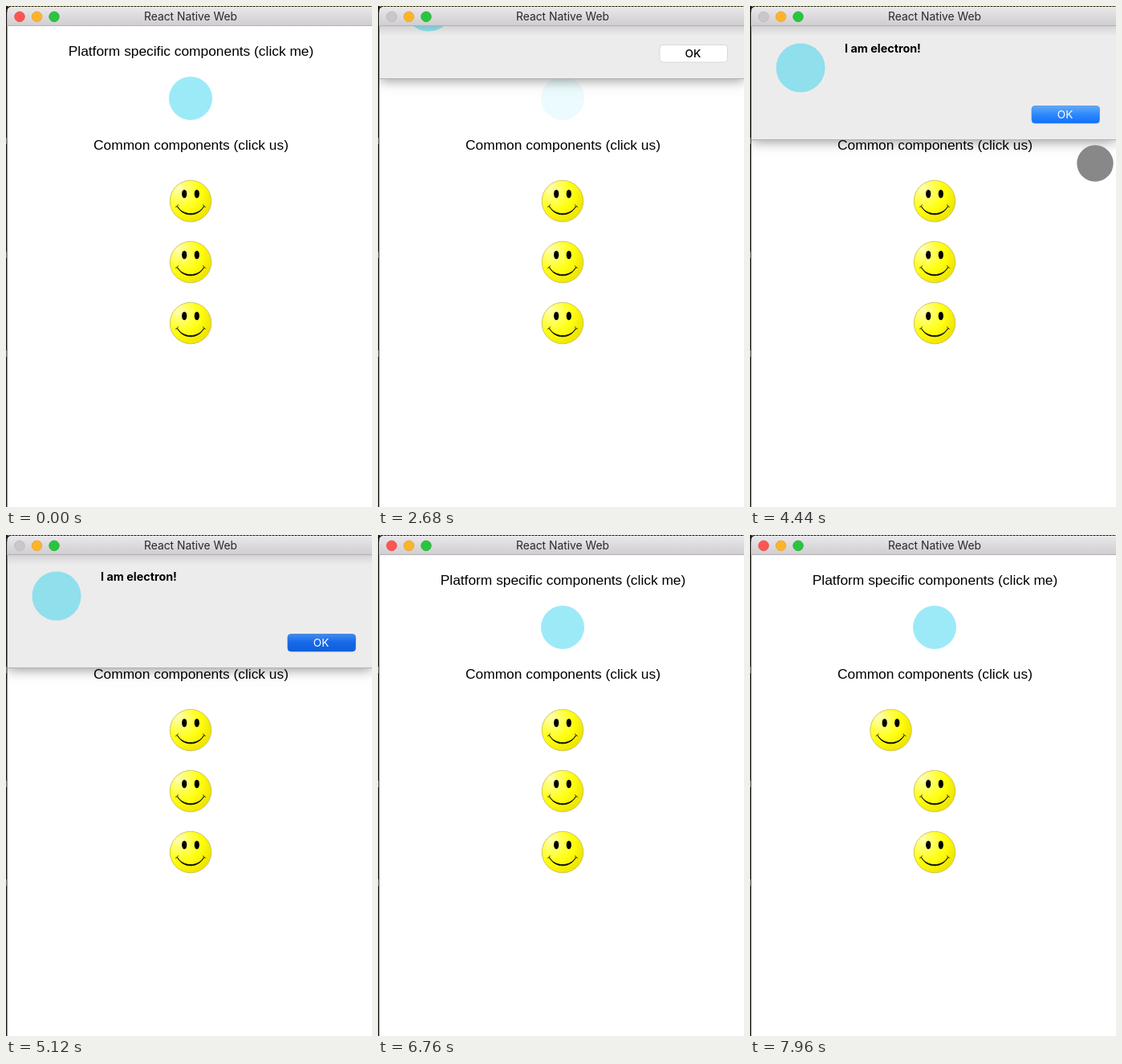
These frames come from a looping animation (456x624 px, 8000 ms). An HTML page with a canvas:

```html
<!DOCTYPE html>
<html lang="en">
<head>
<meta charset="utf-8">
<title>React Native Web</title>
<style>
  html, body { margin: 0; width: 100%; height: 100%; overflow: hidden; background: #fff; }
  canvas { display: block; width: 456px; height: 624px; }
</style>
</head>
<body>
<canvas id="stage" width="456" height="624"></canvas>
<script>
const W = 456, H = 624, LOOP = 8000, STEP = 40;
const ctx = document.getElementById('stage').getContext('2d');
const BODY = '17.35px "Liberation Sans", Arial, sans-serif';
const UI = 'Inter, "Open Sans", sans-serif';
const SHEET_TOP = 25, SHEET_H = 142;

const progress = (t, a, b) => Math.min(1, Math.max(0, (t - a) / (b - a)));
const smooth = p => p * p * (3 - 2 * p);
const mix = (a, b, p) => a + (b - a) * p;

// Pointer strokes: lists of [time, x, y]; the pointer is hidden outside them.
const strokes = [
  [[680, 474, 153], [1480, 314, 133.5], [1840, 219, 116], [1880, 219, 116]],
  [[3640, 473.5, 317], [4440, 430, 196], [4800, 410, 142], [4840, 410, 142]],
  [[6800, 476, 314], [7480, 230, 243], [7560, 230, 243]]
];

function circle(x, y, r, fill, stroke) {
  ctx.beginPath();
  ctx.arc(x, y, r, 0, Math.PI * 2);
  ctx.fillStyle = fill;
  ctx.fill();
  if (stroke) {
    ctx.strokeStyle = stroke;
    ctx.lineWidth = 0.8;
    ctx.stroke();
  }
}

function text(str, x, y, font, color, align = 'center') {
  ctx.font = font;
  ctx.fillStyle = color;
  ctx.textAlign = align;
  ctx.fillText(str, x, y);
}

function vertical(y0, y1, ...colors) {
  const g = ctx.createLinearGradient(0, y0, 0, y1);
  colors.forEach((c, i) => g.addColorStop(i / (colors.length - 1), c));
  return g;
}

function smiley(x, y) {
  ctx.save();
  ctx.translate(x, y);
  const skin = ctx.createRadialGradient(-15, -16, 0, -9, -9, 36);
  skin.addColorStop(0, '#ffffb4');
  skin.addColorStop(0.35, '#ffff5a');
  skin.addColorStop(0.65, '#ffff10');
  skin.addColorStop(1, '#f0e600');
  circle(0, 0, 25.8, skin, '#c4b95c');

  ctx.fillStyle = '#000';
  for (const side of [-1, 1]) {
    ctx.beginPath();
    ctx.ellipse(side * 7.8, -9, 3.1, 5.3, 0, 0, Math.PI * 2);
    ctx.fill();
  }
  ctx.beginPath();
  ctx.moveTo(-16.5, 6.5);
  ctx.bezierCurveTo(-10, 20.2, 10, 20.2, 16.5, 6.5);
  ctx.bezierCurveTo(9.8, 18.6, -9.8, 18.6, -16.5, 6.5);
  ctx.fill();
  ctx.strokeStyle = '#000';
  ctx.lineWidth = 0.8;
  ctx.stroke();
  for (const side of [-1, 1]) {
    ctx.beginPath();
    ctx.moveTo(side * 18.8, 7.4);
    ctx.quadraticCurveTo(side * 16.8, 7.2, side * 15.4, 4.4);
    ctx.stroke();
  }
  ctx.restore();
}

function page(t) {
  text('Platform specific components (click me)', 230.5, 62, BODY, '#000');
  text('Common components (click us)', 230.5, 179, BODY, '#000');

  const pressed = progress(t, 1840, 2000) - progress(t, 5720, 5960);
  ctx.globalAlpha = mix(1, 0.2, pressed);
  circle(230, 115, 27, '#9ceaf8');
  ctx.globalAlpha = 1;

  const shake = t < 7560 ? 0 : 54.5 * Math.sin((t - 7560) / 400 * Math.PI * 1.5);
  smiley(230 + shake, 243);
  smiley(230, 319);
  smiley(230, 395);
}

function button(t) {
  const blue = t >= 2840, down = t >= 5000;
  ctx.beginPath();
  ctx.roundRect(351, 124.5, 84.5, 21.5, 4);
  ctx.fillStyle = !blue ? '#fff'
    : down ? vertical(124, 146, '#3f8df2', '#1668e6', '#0d5fdc')
    : vertical(124, 146, '#62acf9', '#2f89fb', '#0f6ffc');
  ctx.fill();
  ctx.strokeStyle = !blue ? '#cbcbcb' : down ? '#2a6ccf' : '#3f8cec';
  ctx.lineWidth = 0.7;
  ctx.stroke();
  text('OK', 392.5, 140, `${blue ? 400 : 500} 13.6px ${UI}`, blue ? '#fff' : '#000');
}

function sheet(t) {
  const open = smooth(progress(t, 2560, 2812)) - smooth(progress(t, 5106, 5340));
  if (open <= 0) return;
  const shift = Math.round((open - 1) * SHEET_H);
  const bottom = SHEET_TOP + SHEET_H + shift;

  ctx.save();
  ctx.beginPath();
  ctx.rect(1, SHEET_TOP, W, H);
  ctx.clip();
  ctx.shadowColor = 'rgba(0,0,0,0.4)';
  ctx.shadowBlur = 14;
  ctx.shadowOffsetY = 2;
  ctx.fillStyle = '#ececec';
  ctx.fillRect(2, bottom - SHEET_H, W - 2, SHEET_H);
  ctx.shadowColor = 'transparent';
  ctx.fillStyle = '#b4b4b4';
  ctx.fillRect(2, bottom - 1, W - 2, 1);

  ctx.translate(0, shift);
  circle(63, 77, 30.5, '#8fdfec');
  text('I am electron!', 118, 58, '700 14.35px ' + UI, '#000', 'left');
  button(t);
  ctx.translate(0, -shift);

  ctx.fillStyle = vertical(25, 37, 'rgba(0,0,0,0.1)', 'rgba(0,0,0,0)');
  ctx.fillRect(2, 25, W - 2, Math.min(12, bottom - 25));
  ctx.restore();
}

function frame(t) {
  // Desktop showing along the top and left edges.
  ctx.fillStyle = '#1c1b18';
  ctx.fillRect(0, 0, W, 8);
  ctx.fillRect(0, 0, 1.5, H);
  ctx.fillStyle = '#8e8744';
  for (let x = 2; x < W; x += 4) ctx.fillRect(x, 0, 2, 1);
  ctx.fillStyle = '#77777a';
  for (const y of [164, 306, 429]) ctx.fillRect(0, y, 1, 8);

  ctx.beginPath();
  ctx.roundRect(1.5, 1, W + 10, 24, [5, 0, 0, 0]);
  ctx.fillStyle = vertical(1, 25, '#ebe8ec', '#dddade', '#d0cdd1');
  ctx.fill();
  ctx.fillStyle = '#b3b0b4';
  ctx.fillRect(1.5, 24, W, 1);

  const blocked = t >= 2600 && t < 5340;
  circle(17, 13.3, 6.3, blocked ? '#cac7cb' : '#fc5652', blocked ? '#bab7bb' : '#e64c48');
  circle(38.5, 13.3, 6.3, '#fdb32b', '#e6a226');
  circle(60, 13.3, 6.3, '#2ac53f', '#25b238');
  text('React Native Web', 230, 18.3, '13.85px ' + UI, '#2a282a');
}

function pointer(t) {
  for (const s of strokes) {
    if (t < s[0][0] || t >= s[s.length - 1][0]) continue;
    const i = s.findIndex(k => k[0] > t);
    const [a, b] = [s[i - 1], s[i]];
    const p = progress(t, a[0], b[0]);
    circle(mix(a[1], b[1], p), mix(a[2], b[2], p), 22.7, '#888');
  }
}

function draw(t) {
  ctx.fillStyle = '#fff';
  ctx.fillRect(0, 0, W, H);
  page(t);
  sheet(t);
  frame(t);
  pointer(t);
}

const start = performance.now();
function tick() {
  const t = (performance.now() - start) % LOOP;
  draw(Math.floor(t / STEP) * STEP);
  requestAnimationFrame(tick);
}
tick();
</script>
</body>
</html>
```
